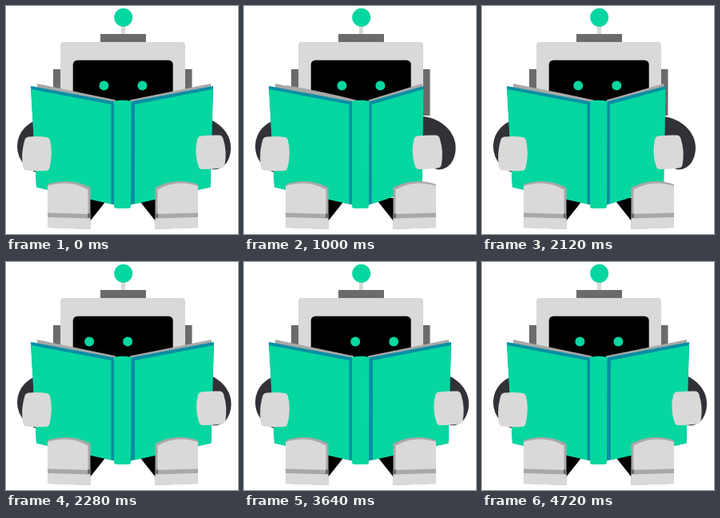
Recreate the animation shown at these times as an HTML page. Size 290 px wide and 285 px high, loop 5280 ms.

```html
<!DOCTYPE html>
<html lang="en">
<head>
<meta charset="utf-8">
<title>Reading robot</title>
<style>
  html, body { margin: 0; width: 100%; height: 100%; overflow: hidden; background: #fff; }
  svg { display: block; width: 100vw; height: 100vh; }
  .green { fill: #06d6a0; }
  .blue { fill: #078fa3; }
  .light { fill: #d9d9d9; }
  .mid { fill: #a8a8a8; }
  .grey { fill: #6b6b6b; }
  .arm { fill: #313138; }
</style>
</head>
<body>
<svg viewBox="0 0 290 285" xmlns="http://www.w3.org/2000/svg">
  <defs>
    <g id="leg">
      <path class="mid" d="M52 223Q80 213.500 105.500 227V279L52 277Z"/>
      <path class="light" d="M52 225Q79 216 102.500 229.500V260L52 258.500Z"/>
      <path class="grey" d="M102 259.500H106V265H102Z"/>
      <path class="light" d="M52 264L105.500 265.500V279L52 277Z"/>
    </g>
  </defs>

  <!-- head -->
  <rect class="light" x="144" y="24" width="5" height="12"/>
  <circle class="green" cx="146.700" cy="14.300" r="11.500"/>
  <rect class="grey" x="118" y="35" width="57" height="12"/>
  <rect class="grey" x="59" y="79" width="10" height="58"/>
  <rect class="grey" x="223" y="79" width="9.500" height="58"/>
  <rect class="light" x="68" y="45" width="156" height="120" rx="4"/>
  <rect x="83.700" y="67.700" width="125" height="80" rx="5.500"/>
  <g id="eyes" class="green">
    <circle cx="122.400" cy="99.500" r="6"/>
    <circle cx="170.400" cy="99.500" r="6"/>
  </g>

  <!-- body behind the book -->
  <circle class="arm" cx="48" cy="175.500" r="34"/>
  <path id="arm" class="arm" d="M231 138H241C264 141 281 158 281 177C281 192 273 204.500 259 204.500L231 195Z"/>
  <path d="M100 240H128L105 269ZM190 240H164L187 269Z"/>

  <!-- book -->
  <path id="page" class="mid"/>
  <path class="mid" d="M39 97L137 117.500V130L39 110Z"/>
  <path class="blue" d="M31 100L135.500 119.500V248.500L38 226.500Z"/>
  <path class="green" d="M31.200 104L131.500 123V247.500L38 226.500Z"/>
  <g id="half">
    <path class="mid" d="M256 97L155 117.500V130L256 110Z"/>
    <path class="blue" d="M259 100L155.500 119.500V248.500L255.500 226.500Z"/>
    <path class="green" d="M258.800 104L161 123V247.500L255.500 226.500Z"/>
  </g>
  <path class="green" d="M135 119Q146 116.500 156.500 119L156 250Q156 253 153 253H138Q135 253 135 250Z"/>

  <!-- hands and legs -->
  <path class="light" d="M28 163.500Q40 162.500 51 164Q54 164.500 55 168Q59 184 54.500 202Q53.500 206 50 206Q36 206.500 25 205.500Q22 205 21 201Q18.500 183 23.500 167Q24.500 164 28 163.500Z"/>
  <path id="hand" class="light" d="M243 162.500Q256 161 267 161.500Q270.500 162 271.500 166Q276.500 182 273.500 198Q273 202 269 202.500Q257 204 245 204Q241.500 204 240.500 200Q235 183 239 167Q240 163 243 162.500Z"/>
  <use href="#leg"/>
  <use href="#leg" transform="matrix(-1 0 0 1 292 0)"/>
</svg>
<script>
  const LOOP = 5280, STEP = 40, HINGE = 157;
  const get = id => document.getElementById(id);
  const [eyes, arm, page, half, hand] = ['eyes', 'arm', 'page', 'half', 'hand'].map(get);

  // Damped spring from 0 to 1, with a slight overshoot near 200 ms.
  function spring(ms) {
    if (ms <= 0) return 0;
    const a = ms * Math.PI / 200, k = 1.116;
    return 1 - Math.exp(-k * a) * (Math.cos(a) + k * Math.sin(a));
  }

  const shift = (el, x) => el.setAttribute('transform', `translate(${x.toFixed(2)} 0)`);

  function turnPage(t, sink) {
    const visible = t >= 800 && sink < 0.95;
    page.setAttribute('visibility', visible ? 'visible' : 'hidden');
    if (!visible) return;
    const angle = Math.min(180, (t - 764) * 32 / 36) * Math.PI / 180;
    const c = Math.cos(angle);
    const x = 150 + 97 * c;
    const y = 99 - 37 * Math.sin(angle) + 8 * sink;
    const bx = 146, by = 119;
    const mx = (x + bx) / 2, my = (y + by) / 2 + 7 * c + 5 + 8 * sink;
    page.setAttribute('d', `M${bx} ${by}Q${mx} ${my} ${x} ${y}V${y + 60}L${bx} 190Z`);
  }

  function draw(now) {
    const t = Math.floor(now % LOOP / STEP) * STEP;
    const reopen = spring(t - 2096);
    const fold = spring(t - 776) - reopen;

    half.setAttribute('transform', `translate(${HINGE} 0) scale(${1 - 0.328 * fold} 1) translate(${-HINGE} 0)`);
    shift(hand, -26 * fold);
    shift(arm, -16 * fold);
    shift(eyes, -17.800 * reopen + 34.600 * spring(t - 2976) - 16.800 * spring(t - 4256));
    turnPage(t, reopen);
  }

  const start = performance.now();
  function tick() {
    draw(performance.now() - start);
    requestAnimationFrame(tick);
  }
  tick();
</script>
</body>
</html>
```
